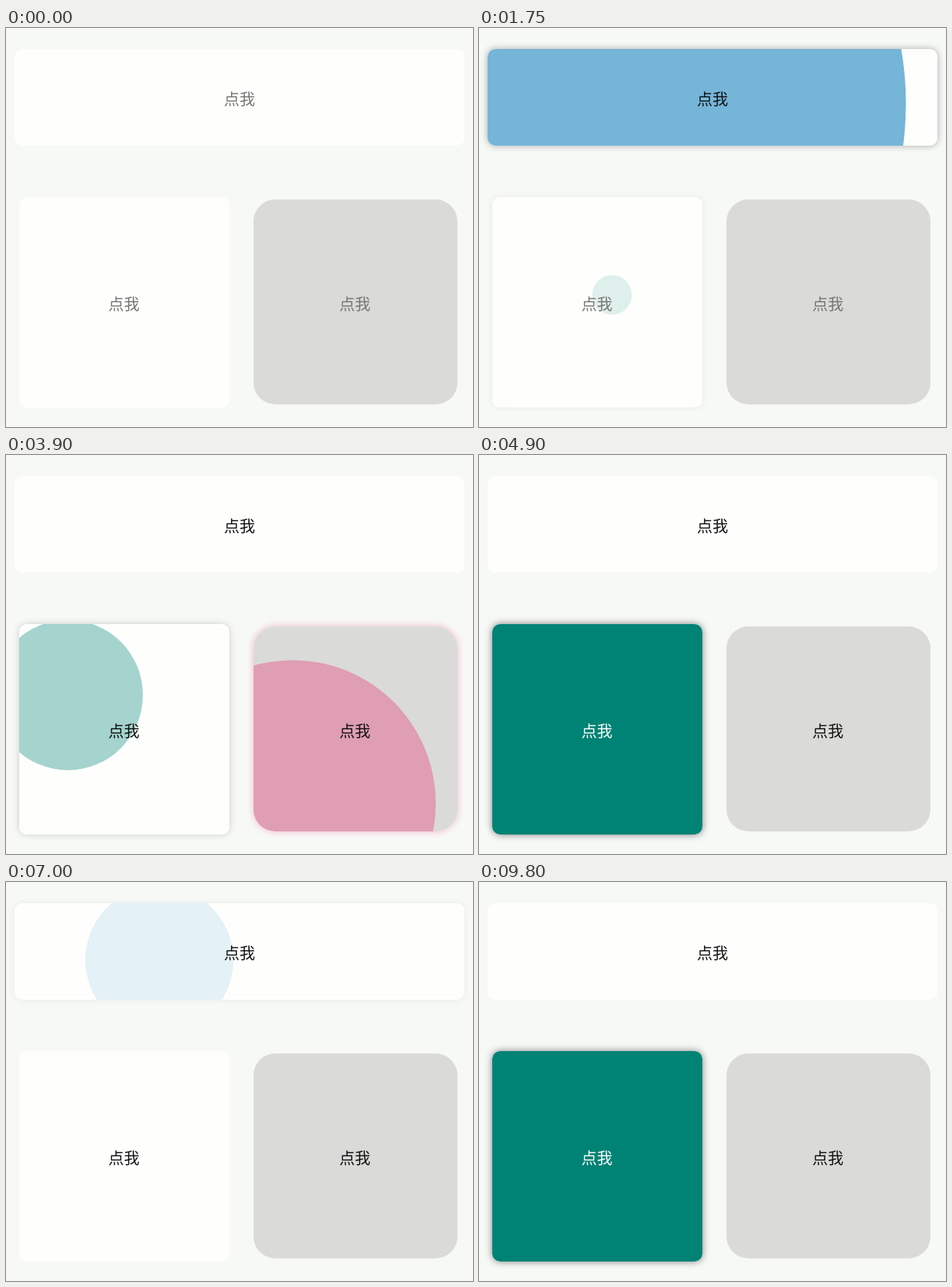
An HTML page that plays this animation: 600 by 512 pixels, repeating every 10 s.

```html
<!DOCTYPE html>
<html lang="zh">
<head>
<meta charset="utf-8">
<title>点我</title>
<style>
  html, body { margin: 0; width: 100%; height: 100%; overflow: hidden; background: #f7f9f7; }
  #stage { position: relative; width: 600px; height: 512px; overflow: hidden; }
  .card { position: absolute; border-radius: var(--round); }
  .card > * { position: absolute; inset: 0; border-radius: inherit; }
  .glow { box-shadow: 0 0 10px var(--glow); opacity: 0; }
  .face { background: var(--face); overflow: hidden; }
  .ripple { position: absolute; inset: 0; background: var(--ink); opacity: 0; }
  .label {
    display: flex; align-items: center; justify-content: center;
    font: 300 20px/20px "Noto Sans CJK SC", "Noto Sans CJK", sans-serif;
  }
  #bar {
    left: 11px; top: 27px; width: 578px; height: 124px;
    --round: 10px; --face: #fefffd; --ink: #288bc4; --glow: rgba(0, 0, 0, .5);
  }
  #left {
    left: 16.5px; top: 217px; width: 270px; height: 270px;
    --round: 10px; --face: #fefffd; --ink: #008375; --glow: rgba(0, 0, 0, .5);
  }
  #right {
    left: 317.5px; top: 220px; width: 262.5px; height: 263px;
    --round: 28px; --face: #dadbd8; --ink: #e91e63; --glow: #e91e63;
  }
  #bar .label { top: 4px; }
  #left .label { top: 3px; }
  #right .label { top: 4px; left: -1px; }
</style>
</head>
<body>
<div id="stage"></div>
<script>
const LOOP = 10000, STEP = 50;
const GROW = 1000, SHRINK = 260, FADE = 400, TEXT_DELAY = 100;

// Each press: start, release, and the pressed point on the stage.
const presses = {
  bar: [[480, 1723, 139, 97], [5446, 6880, 197, 100]],
  left: [[1730, 2685, 171.5, 342.5], [3835, 5435, 80, 308], [8250, LOOP, 126, 438]],
  right: [[2685, 3835, 369, 447]]
};

function bezier(x1, y1, x2, y2) {
  const at = (a, b, s) => 3 * s * (1 - s) ** 2 * a + 3 * s * s * (1 - s) * b + s ** 3;
  return x => {
    if (x <= 0) return 0;
    if (x >= 1) return 1;
    let lo = 0, hi = 1;
    for (let i = 0; i < 30; i++) {
      const mid = (lo + hi) / 2;
      if (at(x1, x2, mid) < x) lo = mid; else hi = mid;
    }
    return at(y1, y2, lo);
  };
}
const easeOut = bezier(.16, 1, .3, 1);
const ease = bezier(.25, .1, .25, 1);

const stage = document.getElementById('stage');
const cards = Object.keys(presses).map(id => {
  const el = document.createElement('div');
  el.id = id;
  el.className = 'card';
  el.innerHTML = '<div class="glow"></div><div class="face"><div class="ripple"></div></div>' +
    '<div class="label">点我</div>';
  stage.append(el);
  const part = name => el.querySelector('.' + name);
  return {
    list: presses[id], x: el.offsetLeft, y: el.offsetTop, w: el.offsetWidth, h: el.offsetHeight,
    glow: part('glow'), ripple: part('ripple'), label: part('label')
  };
});

function drawCard(card, t) {
  const press = card.list.filter(p => p[0] <= t).pop();
  let size = 0, alpha = 0, x = 0, y = 0, color = '#757673';
  if (press) {
    const [start, end, px, py] = press;
    x = px - card.x;
    y = py - card.y;
    if (t < end) {
      size = alpha = easeOut((t - start) / GROW);
      if (t - start > TEXT_DELAY) color = '#fff';
      else if (press !== card.list[0]) color = '#111';
    } else {
      size = 1 - ease((t - end) / SHRINK);
      alpha = 1 - easeOut((t - end) / FADE);
      color = '#111';
    }
  }
  // The full ripple just reaches the farthest corner.
  const full = Math.hypot(Math.max(x, card.w - x), Math.max(y, card.h - y));
  card.ripple.style.clipPath = `circle(${size * full}px at ${x}px ${y}px)`;
  card.ripple.style.opacity = alpha;
  card.glow.style.opacity = alpha;
  card.label.style.color = color;
}

function frame() {
  const t = Math.floor(performance.now() % LOOP / STEP) * STEP;
  cards.forEach(card => drawCard(card, t));
  requestAnimationFrame(frame);
}
frame();
</script>
</body>
</html>
```
